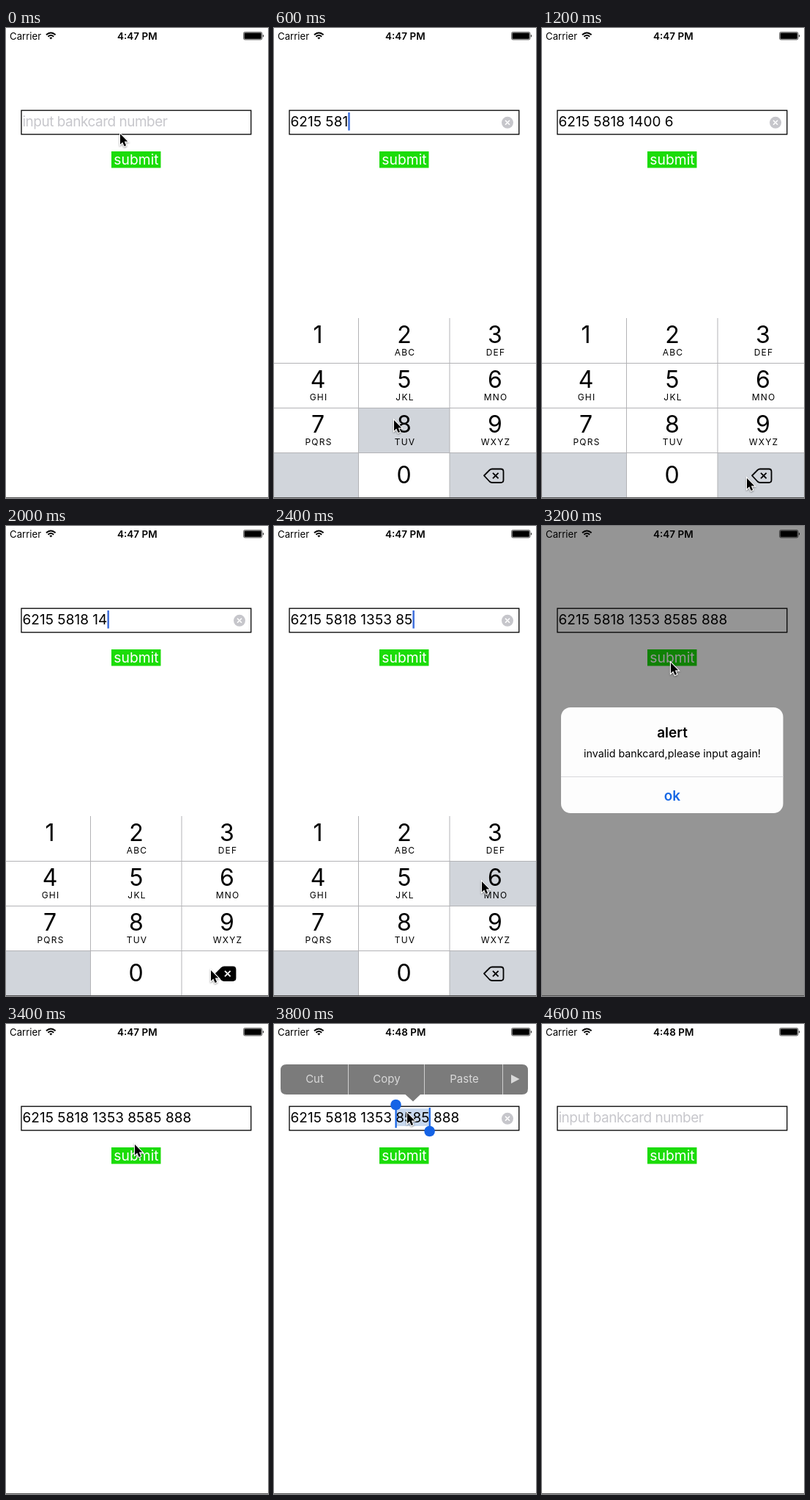
An HTML page for the animation above (4.8 s loop, 358 px wide and 640 px high).

```html
<!DOCTYPE html>
<html lang="en">
<head>
<meta charset="utf-8">
<title>Card number form</title>
<style>
  html, body { margin: 0; width: 100%; height: 100%; overflow: hidden; background: #fff; }
  svg { display: block; width: 358px; height: 640px; font-family: Inter, "Liberation Sans", sans-serif; }
  text { white-space: pre; }
  .mid { text-anchor: middle; }
  .value { font-size: 19px; letter-spacing: .03px; }
  .hint { font-size: 19px; letter-spacing: -.5px; fill: #c7c7cc; }
  .digit { font-size: 32px; }
  .letters { font-size: 12px; letter-spacing: 1.2px; }
  .menu text { font-size: 15px; fill: #d9d9d9; }
</style>
</head>
<body>
<svg viewBox="0 0 358 640">
  <rect width="358" height="640" fill="#fff"/>

  <text x="5" y="15.5" font-size="13.2">Carrier</text>
  <g fill="none" stroke="#000" stroke-width="2">
    <path d="M55 9.3Q61.3 3.6 67.6 9.3M57.4 11.8Q61.3 8.2 65.2 11.8"/>
    <path d="M59.3 13.2Q61.3 11.6 63.3 13.2L61.3 15.4Z" fill="#000" stroke="none"/>
  </g>
  <text id="clock" x="152" y="15.5" font-size="13.5" font-weight="600"></text>
  <rect x="324.5" y="5.5" width="25.5" height="10.5" rx="2" fill="#999" stroke="#777"/>
  <rect x="325.8" y="6.8" width="22.9" height="7.9" rx="1"/>
  <path d="M351 8.7Q353 10.7 351 12.7Z"/>

  <rect id="selection" x="167" y="115" width="46" height="24" fill="#c7d8ee"/>
  <rect x="21" y="112.2" width="313.8" height="32.6" fill="none" stroke="#000" stroke-width="1.3"/>
  <text id="hint" class="hint" x="22.5" y="134">input bankcard number</text>
  <text id="value" class="value" x="22.5" y="134"></text>
  <rect id="caret" y="115" width="2.5" height="24.5" fill="#3f6fdc"/>
  <g id="clear">
    <circle cx="319" cy="128.8" r="8" fill="#c6c6cb"/>
    <path d="M316 125.8l6 6m0-6l-6 6" stroke="#fff" stroke-width="1.6"/>
  </g>
  <rect x="144" y="168" width="67.5" height="22.5" fill="#1bdc08"/>
  <text class="mid" x="178" y="186" font-size="19.3" fill="#fff">submit</text>

  <g id="handles" fill="#1463e6">
    <rect x="165.5" y="110" width="2.2" height="31.5"/>
    <rect x="211.7" y="114" width="2.2" height="32"/>
    <circle cx="166.5" cy="110" r="7.3"/>
    <circle cx="212.6" cy="146" r="7.3"/>
  </g>
  <g id="menu" class="menu">
    <path d="M17 55H339Q347 55 347 63V88Q347 96 339 96H200L190 105.5 179.5 96H17Q9 96 9 88V63Q9 55 17 55Z" fill="#7b7b7b"/>
    <path d="M101.5 55V96M205.5 55V96M312.5 55V96" stroke="#cfcfcf"/>
    <text class="mid" x="55.5" y="80">Cut</text>
    <text class="mid" x="154" y="80">Copy</text>
    <text class="mid" x="260" y="80">Paste</text>
    <path d="M324 69L335.5 75 324 81Z" fill="#d9d9d9"/>
  </g>

  <g id="keypad"></g>

  <g id="alert">
    <rect width="358" height="640" opacity=".415"/>
    <rect x="26" y="247" width="303.5" height="144" rx="13" fill="#fdfdfd"/>
    <text class="mid" x="178" y="287.5" font-size="19" font-weight="600">alert</text>
    <text class="mid" x="178" y="314.5" font-size="14.3">invalid bankcard,please input again!</text>
    <path d="M26 341.5H329.5" stroke="#d8d8dc"/>
    <text class="mid" x="178" y="373.7" font-size="19" font-weight="600" fill="#1768e5">ok</text>
  </g>
  <rect y="639" width="358" height="1" fill="#555"/>
  <path id="pointer" d="M0 0V14.6L3.3 11.6 5.6 17 8.1 15.9 5.8 10.6H10.3Z"
        stroke="#fff" stroke-width="2.2" paint-order="stroke" style="filter:drop-shadow(0 1px 1px #0006)"/>
</svg>
<script>
const STEP = 200;
const GREY = "#d1d5db";
const FULL = "6215 5818 1353 8585 888";
const $ = id => document.getElementById(id);
const show = (id, on) => $(id).setAttribute("visibility", on ? "visible" : "hidden");

const COLS = [0, 116, 240, 358];
const ROWS = [395, 457, 518, 579, 639];
const CENTRES = [60, 178, 302];
const LETTERS = ["", "ABC", "DEF", "GHI", "JKL", "MNO", "PQRS", "TUV", "WXYZ"];

const keyRect = (id, col, row, fill) =>
  `<rect id="${id}" x="${COLS[col]}" y="${ROWS[row]}" width="${COLS[col + 1] - COLS[col]}"
    height="${ROWS[row + 1] - ROWS[row]}" fill="${fill}"/>`;

function buildKeypad() {
  const keys = LETTERS.map((letters, i) => {
    const col = i % 3, row = Math.floor(i / 3), x = CENTRES[col], y = 429 + row * 61;
    return keyRect("key" + (i + 1), col, row, "#fff") +
      `<text class="digit mid" x="${x}" y="${y}">${i + 1}</text>
       <text class="letters mid" x="${x + 1}" y="${y + 17}">${letters}</text>`;
  });
  $("keypad").innerHTML = keys.join("") +
    keyRect("blank", 0, 3, GREY) + keyRect("key0", 1, 3, "#fff") + keyRect("del", 2, 3, GREY) +
    `<text class="digit mid" x="177.5" y="620">0</text>
     <path d="M115.5 395V639M240 395V639M0 456.5H358M0 517.5H358M0 578.5H358" stroke="#b3b3b6"/>
     <path id="delShape" d="M287 609.5L294.5 602Q296 600.5 298 600.5H310Q313.5 600.5 313.5 604V615.5Q313.5 619 310 619H298Q296 619 294.5 617.5Z"
       stroke="#000" stroke-width="1.8" stroke-linejoin="round"/>
     <path id="delCross" d="M299 605.8l7.6 7.6m0-7.6l-7.6 7.6" stroke-width="1.9"/>`;
}

// One entry per step: typed text, pointer position, and any extras.
const typing = (text, pointer, extra) => ({ text, pointer, keypad: true, caret: text.length, ...extra });
const plain = (text, pointer, extra) => ({ text, pointer, ...extra });
const noClear = { clear: false };

const steps = [
  plain("", [156, 144]),
  typing("6", [239, 480]),
  typing("6215 5", [172, 477]),
  typing("6215 581", [164, 534], { press: 8 }),
  typing("6215 5818 14", [190, 617]),
  typing("6215 5818 1400", [168, 600]),
  typing("6215 5818 1400 6", [280, 613], { caret: 0 }),
  typing("6215 5818 1400 65", [241, 479], { caret: 0 }),
  typing("6215 5818 1400 655", [185, 474], { caret: 0 }),
  typing("6215 5818 140", [281, 580]),
  typing("6215 5818 14", [280, 605], { press: "del" }),
  typing("6215 5818 1353 8", [286, 494]),
  typing("6215 5818 1353 85", [284, 484], { press: 6 }),
  plain("6215 5818 1353 8585", null, { caret: 19 }),
  plain("6215 5818 1353 8585 88", null, { caret: 22 }),
  plain(FULL, [214, 129]),
  plain(FULL, [176, 186], { alert: true, ...noClear }),
  plain(FULL, [176, 164], noClear),
  plain(FULL, [181, 134], { caret: 15 }),
  plain(FULL, [182, 121], { menu: 1, selected: true }),
  plain(FULL, [190, 142], { menu: .5, caret: 19 }),
  plain(FULL, [190, 150], { caret: FULL.length }),
  plain("6215 5818 13", null),
  plain("", null)
];

function draw(index) {
  const s = steps[index];
  $("clock").textContent = index < 18 ? "4:47 PM" : "4:48 PM";
  $("value").textContent = s.text;
  show("hint", !s.text);
  show("clear", s.text && s.clear !== false);
  show("caret", s.caret);
  if (s.caret) $("caret").setAttribute("x", 22.5 + $("value").getSubStringLength(0, s.caret));
  show("selection", s.selected);
  show("handles", s.selected);
  $("menu").setAttribute("opacity", s.menu || 0);
  show("alert", s.alert);
  show("pointer", s.pointer);
  if (s.pointer) $("pointer").setAttribute("transform", `translate(${s.pointer})`);

  show("keypad", s.keypad);
  for (let n = 0; n < 10; n++) $("key" + n).setAttribute("fill", s.press === n ? GREY : "#fff");
  const deleting = s.press === "del";
  $("del").setAttribute("fill", deleting ? "#fff" : GREY);
  $("delShape").setAttribute("fill", deleting ? "#000" : "none");
  $("delCross").setAttribute("stroke", deleting ? "#fff" : "#000");
}

buildKeypad();
const start = performance.now();
function tick() {
  const elapsed = performance.now() - start;
  draw(Math.floor(elapsed / STEP) % steps.length);
  requestAnimationFrame(tick);
}
tick();
</script>
</body>
</html>
```
